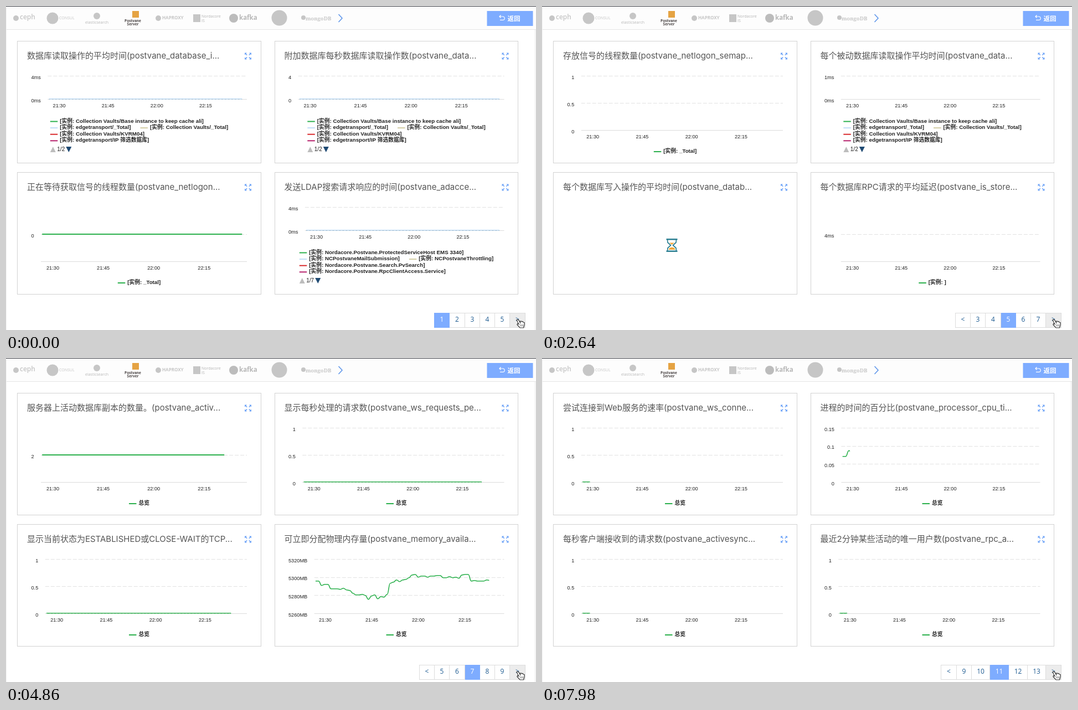
These frames come from a looping animation (957 by 585 pixels, 8000 ms). An HTML page with a canvas:

```html
<!DOCTYPE html>
<html lang="zh">
<head>
<meta charset="utf-8">
<title>Monitor</title>
<style>
html, body { margin: 0; width: 100%; height: 100%; overflow: hidden; background: #fff; }
canvas { display: block; }
</style>
</head>
<body>
<canvas id="stage" width="957" height="585"></canvas>
<script>
const c = document.getElementById('stage').getContext('2d');
const LOOP = 8000, DRAW = 1000, LAG = 30, POINTS = 60;
const G = '#2bb04c', B = '#c0ddf7', T = '#d3cda4', R = '#d92a2c', M = '#b5206b';
const BLUE = '#7eacff', NAVY = '#1f4a73';
const CJK = '"Noto Sans CJK SC", "Noto Sans CJK", sans-serif';
const TITLE = `15px Inter, ${CJK}`;
const AXIS = '9.2px "Liberation Sans", sans-serif';
const LEGEND = `bold 9.75px "Liberation Sans", ${CJK}`;

// ---- chart descriptions: title, y labels, legend rows, series (colour, height in px)
const Y1 = ['1', '0.5', '0'];
const inst = s => `[实例: ${s}]`;
const chart = (title, y, legend, series) => ({ title, y, legend, series });
const single = name => (title, y = Y1, h = 0) => chart(title, y, [[[G, name]]], [[G, h]]);
const total = single(inst('_Total'));
const blank = single(inst(''));
const over = single('总览');
const paged = (title, y, pages, series, rows) => ({ ...chart(title, y, rows, series), pages });

const zeros = [[B, 0]];
const stores = (title, y) => paged(title, y, 2, zeros, [
  [[G, inst('Collection Vaults/Base instance to keep cache ali')]],
  [[B, inst('edgetransport/_Total')], [T, inst('Collection Vaults/_Total')]],
  [[R, inst('Collection Vaults/KVRM04')]],
  [[M, inst('edgetransport/IP 筛选数据库')]]]);
const services = (title, y) => paged(title, y, 7, zeros, [
  [[G, inst('Nordacore.Postvane.ProtectedServiceHost EMS 3340')]],
  [[B, inst('NCPostvaneMailSubmission')], [T, inst('NCPostvaneThrottling')]],
  [[R, inst('Nordacore.Postvane.Search.PvSearch')]],
  [[M, inst('Nordacore.Postvane.RpcClientAccess.Service')]]]);
const clients = (title, y, series) => paged(title, y, 4, series, [
  [[G, inst('Postvane 邮箱基于事件的助手')], [B, inst('Postvane 审批 API')]],
  [[T, inst('Foresee Anyplace')], [R, inst('Postvane Administrator')]],
  [[M, inst('Postvane RPC 服务')], [G, inst('_Total')]],
  [[B, inst('Postvane 监视任务')], [T, inst('Postvane Net 服务')]]]);

const memory = [58, 58, 50, 52, 52, 44, 44, 44, 43, 45, 42, 41, 36, 33, 33, 34, 32, 25, 31, 33, 26,
  30, 29, 34, 54, 56, 60, 57, 60, 61, 64, 69, 70, 65, 67, 67, 65, 67, 67, 68, 68, 64, 64, 66, 64,
  65, 63, 69, 70, 70, 58, 59, 58, 58, 58, 60, 59, 59, 61, 60, 60];
const spike = Array.from({ length: POINTS + 1 }, (_, i) => i === 15 ? 66 : 0);
const cpu = Array.from({ length: POINTS + 1 }, (_, i) => i < 2 ? 46 : 58 + 6 * Math.sin(i * 1.7));

// ---- pages: start time, delay of each chart, charts
const pages = [
  { at: -5000, wait: [0, 0, 0, 0], end: 426.5, charts: [
    stores('数据库读取操作的平均时间(postvane_database_i...', ['4ms', '0ms']),
    stores('附加数据库每秒数据库读取操作数(postvane_data...', ['4', '0']),
    total('正在等待获取信号的线程数量(postvane_netlogon...', ['0'], 49),
    services('发送LDAP搜索请求响应的时间(postvane_adacce...', ['4ms', '0ms'])] },
  { at: 120, wait: [60, 70, 60, 80], charts: [
    stores('数据库写入操作的平均时间(postvane_database_i...', ['4ms', '0ms']),
    stores('附加数据库每秒数据库写入操作数(postvane_data...', ['4', '0']),
    total('持有信号的平均时间(postvane_netlogon_sem...'),
    services('LDAP搜索超时的次数(postvane_adaccess_proc...', ['4', '0'])] },
  { at: 1020, wait: [56, 80, 56, 150], charts: [
    total('启动以来获取信号的总次数(postvane_netlogon_s...'),
    chart('对默认网站建立的当前连接数(postvane_ws_curre...', Y1,
      [[[G, inst('_Total')], ['#c9d9f8', inst('Primary Web Page')]]], zeros),
    total('启动后等待信号时线程超时总次数(postvane_netlo...'),
    services('LDAP读请求响应时间(postvane_adaccess_proc...', ['4ms', '0ms'])] },
  { at: 1770, wait: [60, 60, 80, 80], charts: [
    total('等待信号的线程数量(postvane_netlogon_semap...'),
    stores('每个数据库读取操作的平均时间(postvane_data...', ['1ms', '0ms']),
    stores('每个数据库日志写入平均时间(postvane_datab...', ['1ms', '0ms']),
    blank('当前数据库RPC请求数(postvane_is_store...')] },
  { at: 2550, wait: [80, 80, 140, 80], charts: [
    total('存放信号的线程数量(postvane_netlogon_semap...'),
    stores('每个被动数据库读取操作平均时间(postvane_data...', ['1ms', '0ms']),
    stores('每个数据库写入操作的平均时间(postvane_datab...', ['1ms', '0ms']),
    blank('每个数据库RPC请求的平均延迟(postvane_is_store...', ['4ms'], 49)] },
  { at: 3130, wait: [331, 331, 20, 20], charts: [
    clients('1024数据包服务器RPC延迟(postvane_is_clienttyp...', ['8ms', '0ms'],
      [[G, 21], [G, 10.5], [M, 0]]),
    clients('客户端类型连接每秒RPC操作数(postvane_is_clien...', ['1ms', '0ms'], [[G, 0]]),
    blank('当前信息存储进程全部RPC请求(postvane_is_store...', ['1ms', '0.5ms', '0ms']),
    blank('每个数据库实例每秒RPC操作数(postvane_is_store...', ['1ms', '0.5ms', '0ms'])] },
  { at: 4230, wait: [70, 72, 16, 16], charts: [
    over('服务器上活动数据库副本的数量。(postvane_activ...', ['2'], 49),
    over('显示每秒处理的请求数(postvane_ws_requests_pe...'),
    over('显示当前状态为ESTABLISHED或CLOSE-WAIT的TCP...'),
    over('可立即分配物理内存量(postvane_memory_availa...',
      ['5320MB', '5300MB', '5280MB', '5260MB'], memory)] },
  { at: 5070, wait: [60, 60, 60, 80], charts: [
    over('当前活动的用户连接数(postvane_rpc_active...'),
    over('每秒处理的操作数量(postvane_rpc_operatio...'),
    over('当前连接的用户总数(postvane_rpc_user_co...'),
    over('客户端请求的失败数(postvane_rpc_failed...')] },
  { at: 5790, wait: [40, 40, 40, 60], charts: [
    over('所维护的客户端连接总数(postvane_rpc_conn_co...'),
    over('当前正处理的客户端请求数(postvane_rpc_requests)'),
    over('近1024个数据包的平均延迟(postvane_rpc_avera...'),
    over('表示每个处理器所服务的线程数(postvane_process...', ['1.5', '1', '0.5', '0'], spike)] },
  { at: 6900, wait: [40, 50, 40, 50], charts: [
    over('每秒尝试连接的次数(postvane_ws_connecti...'),
    over('每秒同步命令的数量(postvane_activesync...'),
    over('当前等待处理的请求数(postvane_activesync...'),
    over('每秒发送的邮件数量(postvane_messages_se...')] },
  { at: 7830, wait: [108, 108, 108, 108], charts: [
    over('尝试连接到Web服务的速率(postvane_ws_conne...'),
    over('进程的时间的百分比(postvane_processor_cpu_ti...', ['0.15', '0.1', '0.05', '0'], cpu),
    over('每秒客户端接收到的请求数(postvane_activesync...'),
    over('最近2分钟某些活动的唯一用户数(postvane_rpc_a...')] }
];

// ---- drawing helpers
function text(s, x, y, font, color, align = 'left') {
  c.font = font; c.fillStyle = color; c.textAlign = align; c.textBaseline = 'middle';
  c.fillText(s, x, y);
}
function rect(x, y, w, h, color) { c.fillStyle = color; c.fillRect(x, y, w, h); }
function disc(x, y, r, color) {
  c.fillStyle = color; c.beginPath(); c.arc(x, y, r, 0, 7); c.fill();
}
function poly(pts, fill, stroke, width = 1) {
  c.beginPath();
  pts.forEach(([x, y]) => c.lineTo(x, y));
  if (fill) { c.closePath(); c.fillStyle = fill; c.fill(); }
  if (stroke) { c.strokeStyle = stroke; c.lineWidth = width; c.stroke(); }
}
function hline(x0, x1, y, color, width = 1, dash = []) {
  c.setLineDash(dash);
  poly([[x0, y], [x1, y]], null, color, width);
  c.setLineDash([]);
}
const width = (s, font) => (c.font = font, c.measureText(s).width);

function header() {
  const pale = '#c6c6c6', sans = '"Open Sans", sans-serif';
  rect(0, 0, 957, 585, '#fff');
  rect(0, 0, 957, 43, '#fdfdfd');
  rect(0, 0, 957, 1, '#3a3c44');
  rect(0, 42, 957, 1, '#e4e4e4');
  rect(0, 1, 1, 584, '#f0f0f0');
  rect(955, 43, 1, 542, '#e6e6e6');
  disc(18, 22, 5, pale);
  text('ceph', 25, 21, `600 12px ${sans}`, pale);
  disc(84, 22, 10.5, pale);
  text('CONSUL', 96, 22, `7px ${sans}`, pale);
  disc(164, 18, 6, pale);
  text('elasticsearch', 164, 30, `7px ${sans}`, '#b8b8b8', 'center');
  rect(228, 9, 12, 12, '#e5a343');
  text('Postvane', 229, 27.5, `bold 6.5px ${sans}`, '#4a4444', 'center');
  text('Server', 229, 33.5, `bold 6.5px ${sans}`, '#4a4444', 'center');
  disc(275, 22, 5, pale);
  text('HAPROXY', 282, 22, `bold 8px ${sans}`, pale);
  rect(338, 15, 13, 14, pale);
  text('Nordacore', 353, 19, `7px ${sans}`, '#b4b4b4');
  text('IS', 353, 27, `7px ${sans}`, '#b4b4b4');
  disc(411, 22, 8, '#bcbcbc');
  text('kafka', 421, 22, `bold 11.5px ${sans}`, '#b8b8b8');
  disc(493.5, 21.5, 14, pale);
  disc(537, 21, 4, pale);
  text('mongoDB', 541, 23.5, 'bold 9.5px "Noto Serif", serif', pale);
  poly([[600.5, 15], [607, 22], [600.5, 29]], null, '#5b93ea', 1.5);
  rect(868.5, 9, 83, 27, BLUE);
  text('返回', 917, 22.5, `bold 11.5px ${CJK}`, '#fff', 'center');
  c.strokeStyle = '#fff'; c.lineWidth = 1.2;
  c.beginPath();
  c.moveTo(891, 19); c.lineTo(897, 19); c.arc(897, 22.2, 3.2, -Math.PI / 2, Math.PI / 2); c.lineTo(892, 25.4);
  c.moveTo(893.5, 16.5); c.lineTo(891, 19); c.lineTo(893.5, 21.5);
  c.stroke();
}

function expandIcon(x, y) {
  for (const sx of [-1, 1]) for (const sy of [-1, 1]) {
    const p = (a, b) => [x + sx * a, y + sy * b];
    poly([p(6, 6), p(2, 6), p(6, 2)], '#6fa4f7');
    poly([p(1.8, 1.8), p(5, 5)], null, '#6fa4f7', 1.6);
  }
}

function hourglass(x, y) {
  const teal = '#2b7f92', sand = '#f2a63a';
  poly([[x - 4.5, y - 4.5], [x + 4.5, y - 4.5], [x, y - 1]], sand);
  poly([[x - 6, y + 8], [x - 4.5, y + 5], [x, y + 3.5], [x + 4.5, y + 5], [x + 6, y + 8]], sand);
  for (const s of [-1, 1]) {
    poly([[x + s * 8, y - 10], [x + s * 7.5, y - 5], [x + s * 2, y], [x + s * 7.5, y + 5], [x + s * 8, y + 10]],
      null, teal, 1.7);
  }
  rect(x - 10, y - 12, 20, 2.5, teal);
  rect(x - 10, y + 9.5, 20, 2.5, teal);
}

function legend({ legend: rows, pages: count }) {
  const item = s => 17.5 + width(s, LEGEND);
  const rowWidth = r => r.reduce((w, [, s]) => w + item(s) + 17, -17);
  const left = 240.5 - Math.max(...rows.map(rowWidth)) / 2;
  const top = count ? 208 : 262.5;
  rows.forEach((row, i) => {
    let x = left;
    const y = top + i * 11.6;
    for (const [color, s] of row) {
      hline(x, x + 13.5, y + .5, color, 2);
      text(s, x + 17.5, y, LEGEND, '#222');
      x += item(s) + 17;
    }
  });
  if (!count) return;
  poly([[left, 264], [left + 5, 254], [left + 10, 264]], '#bdbdbd');
  text('1/' + count, left + 12.5, 259, '10px "Liberation Sans", sans-serif', '#222');
  poly([[left + 28.5, 254], [left + 38.5, 254], [left + 33.5, 264]], NAVY);
}

function curve(x0, x1, base, heights, color) {
  const step = (x1 - x0) / POINTS;
  c.beginPath();
  heights.forEach((h, i) => {
    const x = x0 + i * step, y = base - h, mid = x - step / 2;
    if (i) c.bezierCurveTo(mid, base - heights[i - 1], mid, y, x, y);
    else c.moveTo(x, y);
  });
  c.strokeStyle = color; c.lineWidth = 1.6; c.stroke();
}

function plot(ch, progress, end) {
  const top = 126.5, base = ch.pages ? 168.5 : 224.5, right = 435;
  const label = 45.5 + Math.max(...ch.y.map(s => width(s, AXIS)));
  const left = label + 12.5, span = right - left, last = ch.y.length - 1;
  ch.y.forEach((s, i) => {
    const y = last ? top + (base - top) * i / last : (top + base) / 2;
    if (!last || i < last) hline(left, right, Math.floor(y) + .5, '#e2e2e2', 1, [7, 3]);
    text(s, label, y + 2.5, AXIS, '#222', 'right');
  });
  hline(left, right, base, '#dcdcdc');
  ['21:30', '21:45', '22:00', '22:15'].forEach((s, i) =>
    text(s, left + span * (.0575 + .245 * i), base + 12, AXIS, '#222', 'center'));
  legend(ch);
  if (!progress) return;

  const x0 = left + 2;
  c.save();
  c.beginPath();
  c.rect(x0, 100, (end - x0) * progress, 130);
  c.clip();
  for (const [color, h] of ch.series) {
    if (Array.isArray(h)) curve(x0, end, base - .8, h, color);
    else if (h) hline(x0, end, base - h - .5, color, 2);
    else {
      hline(x0, end, base - .7, color, 1.6);
      hline(x0, end, base, color === B ? '#a3b9c6' : '#b9d9bf', 1, [2, 4]);
    }
  }
  c.restore();
}

function panel(i, ch, age, end) {
  const col = i % 2, dx = col * 464.5, dy = i > 1 ? 237 : 0;
  const drawn = Math.min(Math.max(age - LAG, 0) / DRAW, 1);
  c.strokeStyle = '#d2d2d2'; c.lineWidth = 1;
  c.strokeRect(20.5 + col * 465, 63.5 + dy, 440 - col, 220);
  c.save();
  c.translate(dx, dy);
  text(ch.title, 38, 90.5, TITLE, '#555');
  expandIcon(437, 90.5);
  if (age < 0) hourglass(234.5, 195);
  else plot(ch, 1 - (1 - drawn) ** 3, end);
  c.restore();
}

function pager(page) {
  const first = Math.max(1, page - 2);
  const cells = Array.from({ length: 5 }, (_, i) => String(first + i));
  if (page > 1) cells.unshift('<');
  cells.push('>');
  let x = 937;
  for (const s of cells.reverse()) {
    const w = s.length > 1 ? 33.6 : 27.2, on = s === String(page);
    x -= w;
    const l = Math.floor(x), r = Math.floor(x + w);
    rect(l, 554, r - l, 27, on ? BLUE : s === '>' ? '#ececec' : '#fff');
    c.strokeStyle = on ? BLUE : '#dcdcdc'; c.lineWidth = 1;
    c.strokeRect(l + .5, 554.5, r - l, 26);
    text(s, (l + r) / 2 + .5, 567, '12px "Open Sans", sans-serif', on ? '#fff' : '#1f5c92', 'center');
  }
}

function hand() {
  const pts = [[922, 567], [924, 566], [926, 567.5], [928.5, 572], [928.5, 569], [930.5, 569],
    [931, 570], [933, 569.5], [934, 571], [936, 571.5], [936, 576], [934.5, 581], [928, 581],
    [923, 575.5], [923.5, 573.5], [926, 574.5], [922, 567]];
  poly(pts, '#fff', '#333', 1.2);
  for (const x of [929, 931.2, 933.4]) poly([[x, 575], [x, 578.5]], null, '#555', .8);
}

function render(t) {
  let n = pages.length - 1;
  while (t < pages[n].at) n--;
  const { at, wait, charts, end = 432 } = pages[n];
  header();
  charts.forEach((ch, i) => panel(i, ch, t - at - wait[i], end));
  pager(n + 1);
  hand();
}

const start = performance.now();
function tick() {
  render((performance.now() - start) % LOOP);
  requestAnimationFrame(tick);
}
tick();
</script>
</body>
</html>
```
